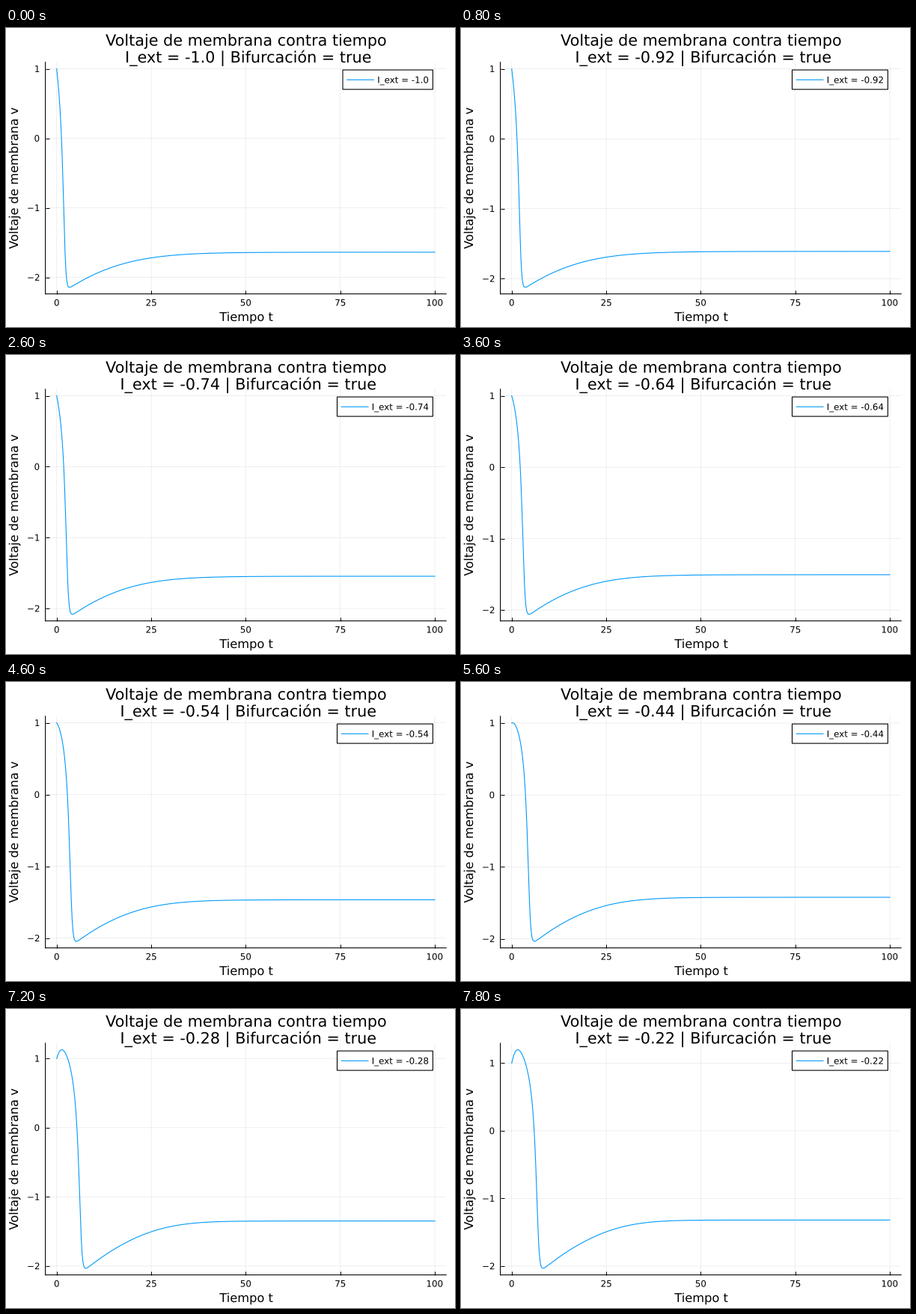
These frames come from a looping animation (600 px wide and 400 px high, 8000 ms). A matplotlib script:

```python
import numpy as np
import matplotlib.pyplot as plt
from matplotlib.animation import FuncAnimation
from matplotlib.patches import PathPatch, Rectangle
from matplotlib.textpath import TextPath
from matplotlib.transforms import Affine2D

W, H, DPI = 600, 400, 100
FRAMES, INTERVAL = 40, 200
LEFT, RIGHT, TOP, BOTTOM = 52.6, 588.2, 45.8, 355.7
MID_X, MID_Y = (LEFT + RIGHT) / 2, (TOP + BOTTOM) / 2
BLUE = "#009afa"
PX = 72 / DPI  # points per pixel
TITLE, GUIDE, SMALL = 20.75, 16.25, 11.85  # text sizes in pixels

plt.rcParams["font.family"] = "DejaVu Sans"
plt.rcParams["path.snap"] = False


def rates(state, current):
    """FitzHugh-Nagumo neuron."""
    v, w = state
    return np.array([v - v**3 / 3 - w + current, 0.08 * (v + 0.7 - 0.8 * w)])


def simulate(currents, dt=0.05, t_end=100):
    """Runge-Kutta solution for all currents at once."""
    steps = round(t_end / dt)
    state = np.array([np.full(len(currents), 1.0), np.full(len(currents), 0.2)])
    volts = [state[0]]
    for _ in range(steps):
        k1 = rates(state, currents)
        k2 = rates(state + dt / 2 * k1, currents)
        k3 = rates(state + dt / 2 * k2, currents)
        k4 = rates(state + dt * k3, currents)
        state = state + dt / 6 * (k1 + 2 * k2 + 2 * k3 + k4)
        volts.append(state[0])
    return np.linspace(0, t_end, steps + 1), np.array(volts).T


currents = np.round(-1 + 0.02 * np.arange(FRAMES), 2)
time, volts = simulate(currents)

fig = plt.figure(figsize=(W / DPI, H / DPI), dpi=DPI, facecolor="white")

# Plot area
ax = fig.add_axes([LEFT / W, 1 - BOTTOM / H, (RIGHT - LEFT) / W, (BOTTOM - TOP) / H])
ax.set_xlim(-3, 103)
ax.set_xticks(range(0, 101, 25))
ax.set_yticks(range(-2, 2))
ax.tick_params(direction="in", length=5 * PX, width=PX,
               labelbottom=False, labelleft=False)
ax.grid(color="black", alpha=0.1, linewidth=0.6 * PX)
ax.set_axisbelow(True)
for side in ("top", "right"):
    ax.spines[side].set_visible(False)
for side in ("left", "bottom"):
    ax.spines[side].set_linewidth(1.1 * PX)
curve, = ax.plot([], [], color=BLUE, linewidth=1.1 * PX)

# Overlay measured in pixels from the top left corner
page = fig.add_axes([0, 0, 1, 1])
page.set_xlim(0, W)
page.set_ylim(H, 0)
page.axis("off")


def text_path(x, y, text, size, align=0.5, angle=0):
    """Outline on baseline y; align None starts at x, 0.5 centres, 1 ends at x."""
    path = TextPath((0, 0), text, size=size)
    shift = 0
    if align is not None:
        ink = path.get_extents()
        shift = ink.x0 + align * ink.width
    move = Affine2D().translate(-shift, 0).rotate_deg(angle).scale(1, -1)
    return path.transformed(move.translate(x, y))


def label(*args, **kw):
    patch = PathPatch(text_path(*args, **kw), facecolor="black", linewidth=0, zorder=3)
    return page.add_patch(patch)


label(MID_X, 23.6, "Voltaje de membrana contra tiempo", TITLE)
label(MID_X + 0.5, 392, "Tiempo t", GUIDE)
label(16, MID_Y + 0.3, "Voltaje de membrana v", GUIDE, angle=90)
for t in range(0, 101, 25):
    label(LEFT + (t + 3) / 106 * (RIGHT - LEFT), 371.6, str(t), SMALL)

subtitle = label(0, 0, "I", TITLE)
entry = label(0, 0, "I", SMALL)
marks = {v: label(0, 0, "0", SMALL) for v in range(-2, 2)}

box = page.add_patch(Rectangle((450, 56.1), 120.4, 26, facecolor="white",
                               edgecolor="black", linewidth=1.1 * PX))
key, = page.plot([], [], color=BLUE, linewidth=1.1 * PX)


def draw(i):
    v = volts[i]
    pad = 0.03 * (v.max() - v.min())
    low, high = v.min() - pad, v.max() + pad
    ax.set_ylim(low, high)
    curve.set_data(time, v)

    for value, mark in marks.items():
        y = TOP + (high - value) / (high - low) * (BOTTOM - TOP)
        text = str(value).replace("-", "\u2212")
        mark.set_path(text_path(44.3, y + 4.3, text, SMALL, align=1))

    name = f"I_ext = {float(currents[i])}"
    subtitle.set_path(text_path(MID_X + 3.8, 46.2,
                                f"{name} | Bifurcación = true", TITLE))

    # The legend grows to the left with its text
    x = 450 - 7.5 * (len(name) - len("I_ext = -1.0"))
    box.set_x(x)
    box.set_width(570.4 - x)
    key.set_data([x + 5.7, x + 41.5], [69.3, 69.3])
    entry.set_path(text_path(x + 46.2, 73.6, name, SMALL, align=None))
    return curve, subtitle, box, key, entry, *marks.values()


anim = FuncAnimation(fig, draw, frames=FRAMES, interval=INTERVAL,
                     repeat=True, repeat_delay=0, blit=False)
plt.show()
```
